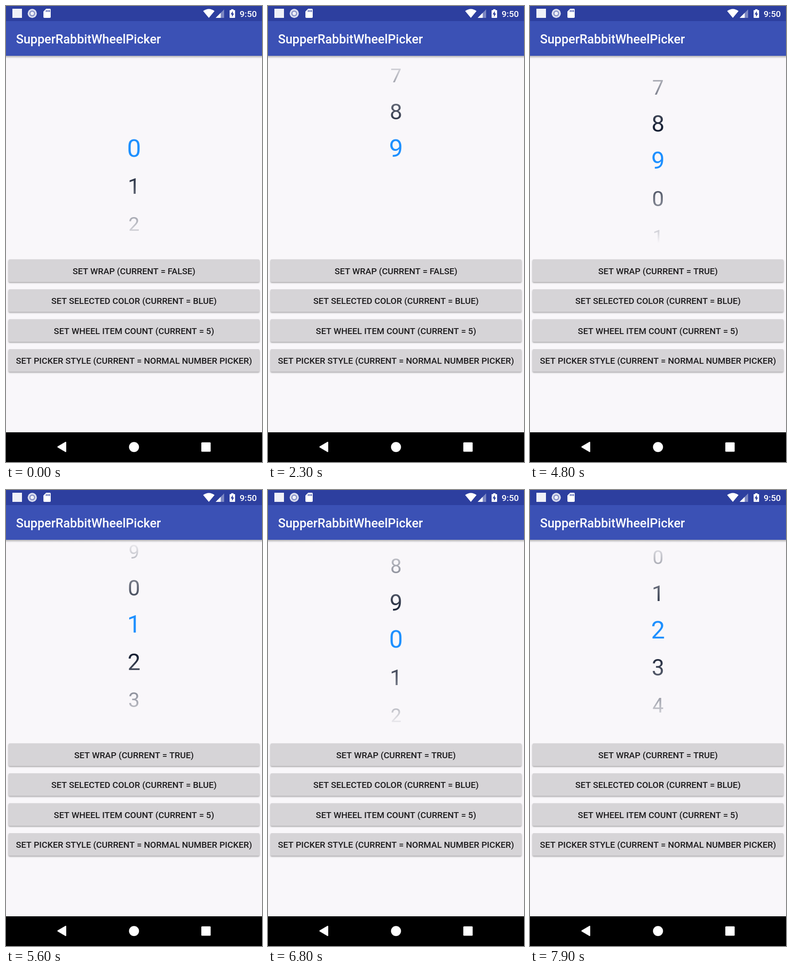
These frames come from a looping animation (561 px wide and 998 px high, 8000 ms). An HTML page with a canvas:

```html
<!DOCTYPE html>
<html lang="en">
<head>
<meta charset="utf-8">
<title>Wheel picker</title>
<style>
  html, body { margin: 0; width: 100%; height: 100%; overflow: hidden; background: #f9f7fa; }
  canvas { display: block; }
</style>
</head>
<body>
<canvas id="stage" width="561" height="998"></canvas>
<script>
const ctx = document.getElementById('stage').getContext('2d');
const LOOP = 8000, STEP = 100, WRAP_AT = 3900, RIPPLE_END = 4300;
const BG = '#f9f7fa', INK = '#161f33', BLUE = '#1e90ff';
const WHEEL = { top: 109, bottom: 519, fade: 158, baseline: 329.5, pitch: 81.4, size: 54.5, shrink: 5.6 };

// [time in ms, wheel position in items]
const KEYS = [[0, 0], [1300, 0], [2300, 9], [3200, 0], [4500, 0],
  [4800, -1.33], [6300, -15.52], [7300, -24.49], [7900, -27.94]];

function slope(i) {
  const a = KEYS[i - 1], b = KEYS[i], c = KEYS[i + 1];
  if (!a || !c || (b[1] - a[1]) * (c[1] - b[1]) <= 0) return 0;
  return (c[1] - a[1]) / (c[0] - a[0]);
}

// Cubic Hermite curve through the keys
function position(t) {
  const i = KEYS.findIndex(k => k[0] > t) - 1;
  if (i < 0) return KEYS[KEYS.length - 1][1];
  const [t0, p0] = KEYS[i], [t1, p1] = KEYS[i + 1];
  const span = t1 - t0, u = (t - t0) / span, v = 1 - u;
  return p0 * v * v * (1 + 2 * u) + p1 * u * u * (3 - 2 * u)
    + span * u * v * (v * slope(i) - u * slope(i + 1));
}

function rect(x, y, w, h, color, radius = 0) {
  ctx.fillStyle = color;
  ctx.beginPath();
  ctx.roundRect(x, y, w, h, radius);
  ctx.fill();
}

function disc(x, y, r, color) {
  ctx.fillStyle = color;
  ctx.beginPath();
  ctx.arc(x, y, r, 0, 2 * Math.PI);
  ctx.fill();
}

function shape(d, color) {
  ctx.fillStyle = color;
  ctx.fill(new Path2D(d));
}

function text(str, x, y, size, color, align = 'left', weight = 500) {
  ctx.font = `${weight} ${size}px Roboto, sans-serif`;
  ctx.textAlign = align;
  ctx.fillStyle = color;
  ctx.fillText(str, x, y);
}

function fadeRect(y0, y1, from, to) {
  const g = ctx.createLinearGradient(0, y0, 0, y1);
  g.addColorStop(0, from);
  g.addColorStop(1, to);
  rect(0, y0, 561, y1 - y0, g);
}

function drawWheel(pos, wrap) {
  const { top, bottom, fade, baseline, pitch, size, shrink } = WHEEL;
  const selected = Math.round(pos);
  ctx.save();
  ctx.beginPath();
  ctx.rect(0, top, 561, bottom - top);
  ctx.clip();
  for (let k = selected - 3; k <= selected + 3; k++) {
    if (!wrap && (k < 0 || k > 9)) continue;
    const d = k - pos;
    text(((k % 10) + 10) % 10, 280.5, baseline + d * pitch, size - shrink * Math.abs(d),
      k === selected ? BLUE : INK, 'center', 400);
  }
  fadeRect(top, top + fade, BG, BG + '00');
  fadeRect(bottom - fade, bottom, BG + '00', BG);
  ctx.restore();
}

function drawButton(label, y) {
  ctx.save();
  ctx.shadowColor = 'rgba(0,0,0,.32)';
  ctx.shadowBlur = 3;
  ctx.shadowOffsetY = 2;
  rect(5.5, y, 550, 49.5, '#d6d4d7', 2.7);
  ctx.restore();
  text(label, 280.5, y + 32, 19.09, '#1c1b1d', 'center');
}

function drawRipple() {
  ctx.save();
  ctx.beginPath();
  ctx.rect(5.5, 554.5, 550, 49.5);
  ctx.clip();
  disc(287, 574, 77, 'rgba(0,0,0,.02)');
  ctx.restore();
}

function drawStatusBar() {
  rect(0, 0, 561, 33, '#2d3f9f');
  rect(14, 6, 21, 20, '#f0f1f8');
  disc(57.5, 16.3, 10, '#dcdfef');
  disc(57.5, 16.3, 6.5, '#8a94c9');
  disc(57.5, 16.3, 3.8, '#f0f1f8');
  shape('M88 6H96Q98 6 98 8V24Q98 26 96 26H84Q82 26 82 24V12Z', '#fff');
  for (const x of [87.5, 91, 94.5]) rect(x, 9, 1.7, 4, '#2d3f9f');
  shape('M444.5 26L432 11Q444.5 2 457 11Z', '#fff');
  shape('M459.5 26L478 7.5V26Z', '#7c87c2');
  shape('M459.5 26L470.5 15V26Z', '#fff');
  shape('M493.5 7H498.5V9H501Q502 9 502 10V25Q502 26 501 26H491Q490 26 490 25V10Q490 9 491 9H493.5Z', '#fff');
  shape('M497 11L492.2 18.5H495.2V24L499.8 16.5H497Z', '#2d3f9f');
  text('9:50', 512, 23.8, 19.09, '#fff');
}

function drawNavBar() {
  rect(0, 933, 561, 65, '#000');
  shape('M113 964Q112 965 113 966L130 976Q132 977 132 975V955Q132 953 130 954Z', '#fff');
  disc(280.5, 965.3, 11, '#fff');
  rect(428, 955, 20.5, 20.5, '#fff', 1.5);
}

function draw(t) {
  const wrap = t >= WRAP_AT;
  rect(0, 0, 561, 998, BG);
  drawWheel(position(t), wrap);
  fadeRect(109, 115, 'rgba(0,0,0,.28)', 'rgba(0,0,0,0)');
  rect(0, 33, 561, 76, '#3b51b5');
  text('SupperRabbitWheelPicker', 22, 81.5, 27.27, '#fff');
  drawStatusBar();
  [`SET WRAP (CURRENT = ${wrap ? 'TRUE' : 'FALSE'})`,
    'SET SELECTED COLOR (CURRENT = BLUE)',
    'SET WHEEL ITEM COUNT (CURRENT = 5)',
    'SET PICKER STYLE (CURRENT = NORMAL NUMBER PICKER)',
  ].forEach((label, i) => drawButton(label, 554.5 + i * 65.5));
  if (wrap && t < RIPPLE_END) drawRipple();
  drawNavBar();
}

const start = performance.now();
function tick() {
  const t = Math.max(0, performance.now() - start) % LOOP;
  draw(Math.floor(t / STEP) * STEP);
  requestAnimationFrame(tick);
}
tick();
</script>
</body>
</html>
```
